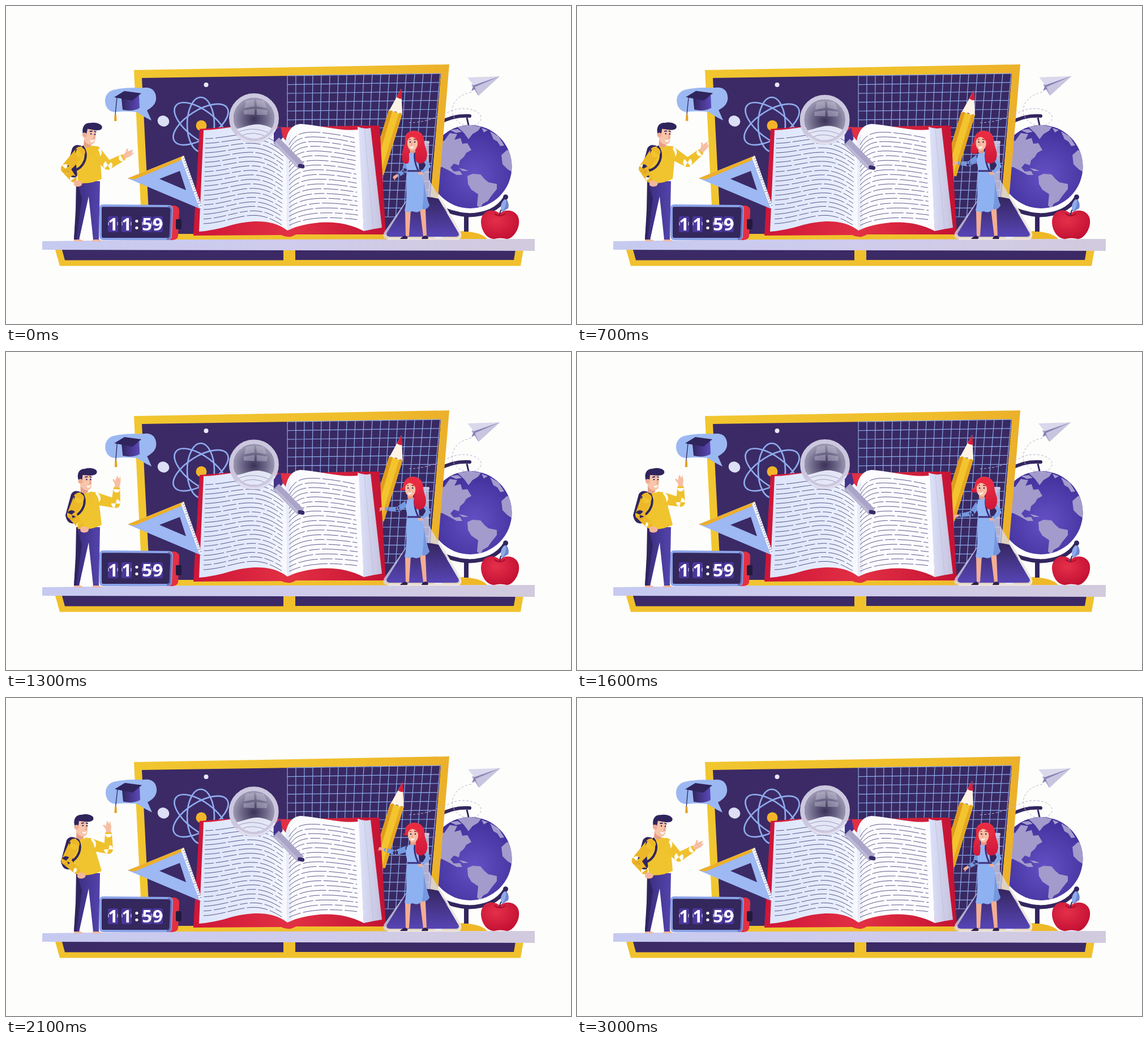
Animation of 998 by 561 pixels, one loop 3.05 s. Source, as an HTML page:

```html
<!DOCTYPE html>
<html lang="en">
<head>
<meta charset="utf-8">
<title>Learning shelf</title>
<style>
html, body { margin: 0; width: 100%; height: 100%; overflow: hidden; background: #fdfdfb; }
svg { display: block; width: 100vw; height: 100vh; }
text { font: 600 31px "Noto Sans", Roboto, sans-serif; font-stretch: extra-condensed; fill: #fff; text-anchor: middle; }
</style>
</head>
<body>
<svg viewBox="0 0 998 561">
  <defs>
    <linearGradient id="gold"><stop offset="0" stop-color="#f1c62f"/><stop offset=".7" stop-color="#f0be2c"/><stop offset="1" stop-color="#ecb02a"/></linearGradient>
    <linearGradient id="shelf"><stop offset="0" stop-color="#c6caf0"/><stop offset=".5" stop-color="#cfcbec"/><stop offset="1" stop-color="#d2cadd"/></linearGradient>
    <linearGradient id="pageL"><stop offset="0" stop-color="#dde5fb"/><stop offset=".75" stop-color="#e8eefd"/><stop offset="1" stop-color="#f8faff"/></linearGradient>
    <linearGradient id="block"><stop offset="0" stop-color="#dce3fa"/><stop offset="1" stop-color="#c6c1dd"/></linearGradient>
    <linearGradient id="cover"><stop offset="0" stop-color="#cf1538"/><stop offset=".5" stop-color="#e23044"/><stop offset="1" stop-color="#c41234"/></linearGradient>
    <linearGradient id="cap"><stop offset="0" stop-color="#32265f"/><stop offset="1" stop-color="#5c49ba"/></linearGradient>
    <linearGradient id="pants"><stop offset="0" stop-color="#3a2c7c"/><stop offset="1" stop-color="#5344ae"/></linearGradient>
    <linearGradient id="liquid" x2="0" y2="1"><stop offset="0" stop-color="#35265f"/><stop offset="1" stop-color="#5745b5"/></linearGradient>
    <linearGradient id="hair" x2="0" y2="1"><stop offset="0" stop-color="#ee2f43"/><stop offset="1" stop-color="#cf1739"/></linearGradient>
    <radialGradient id="ocean" cx=".55" cy=".6" r=".6"><stop offset="0" stop-color="#6450c4"/><stop offset="1" stop-color="#40309a"/></radialGradient>
    <radialGradient id="apple" cx=".4" cy=".35" r=".7"><stop offset="0" stop-color="#e5304a"/><stop offset="1" stop-color="#c20f32"/></radialGradient>
    <radialGradient id="lens" cx=".5" cy=".52" r=".55"><stop offset="0" stop-color="#3b3258"/><stop offset=".5" stop-color="#6a6485"/><stop offset="1" stop-color="#a5a1ba"/></radialGradient>
    <clipPath id="globeClip"><circle cx="820" cy="283.5" r="73.5"/></clipPath>
    <clipPath id="lensClip"><circle r="36"/></clipPath>
  </defs>

  <!-- globe -->
  <path d="M770 411V403L806 397Q840 399 850 411Z" fill="#efb827"/>
  <path d="M813 365V398" stroke="#33265f" stroke-width="8"/>
  <path d="M755 349Q784 367 817 369Q864 368 882 338" fill="none" stroke="#33265f" stroke-width="7" stroke-linecap="round"/>
  <circle cx="820" cy="286" r="77" fill="#fff"/>
  <path d="M764 207Q790 192 819 194" fill="none" stroke="#33265f" stroke-width="6" stroke-linecap="round"/>
  <path d="M814 197L817 210" stroke="#33265f" stroke-width="3"/>
  <circle cx="820" cy="283.5" r="73.5" fill="url(#ocean)"/>
  <g clip-path="url(#globeClip)" fill="#a39bcb">
    <path d="M755 236L774 238L784 224L797 226L792 236L803 233L806 243L815 242L822 254L813 259L809 266L802 272L800 281L791 278L785 285L791 292L802 291L806 298L796 298L782 290L770 284L757 286Z"/>
    <path d="M797 213L820 210L839 213L834 220L824 226L817 235L809 224Z"/>
    <path d="M784 219L798 217L805 222L795 224ZM840 215L851 219L844 223Z"/>
    <path d="M815 300L824 296L838 297L845 305L852 311L867 314L867 323L858 334L851 344L842 349L838 357L832 352L834 332L822 324L816 314Z"/>
    <path d="M855 221L870 230L880 246L873 247L868 239L861 235ZM875 263L885 254L899 260V296L886 288L877 279Z"/>
    <path d="M800 286L810 288L817 291L807 291Z"/>
  </g>

  <!-- board -->
  <path d="M226 113L783 103L757 412H241Z" fill="url(#gold)"/>
  <path d="M240 127L768 119L744 402H254Z" fill="#3b2a65"/>
  <path d="M496 123V402H744L768 119Z" fill="#392962"/>
  <path id="grid" fill="none" stroke="#8dabec" stroke-width="1.2"/>
  <g fill="none" stroke="#8fabee" stroke-width="2.7">
    <ellipse cx="344" cy="209" rx="55" ry="25" transform="rotate(37 344 209)"/>
    <ellipse cx="344" cy="209" rx="55" ry="25" transform="rotate(-32 344 209)"/>
    <ellipse cx="344" cy="209" rx="24" ry="48"/>
  </g>
  <circle cx="345" cy="211" r="9.5" fill="#f3b42a"/>
  <circle cx="353.500" cy="139" r="4" fill="#e8e8f8"/>
  <ellipse cx="278" cy="203" rx="10.500" ry="9.500" transform="rotate(25 278 203)" fill="#dcdff5"/>

  <g id="pencil">
    <path d="M676 184L700 190L667 298L643 292Z" fill="#f3c42d"/>
    <path d="M676 184L683 183L650 294L643 292Z" fill="#e09b1e"/>
    <path d="M694 189L700 190L667 298L661 297Z" fill="#e6a822"/>
    <path d="M698 146L676 186Q681 182 684 187Q690 184 692 190Q697 187 700 191Z" fill="#fff3e6"/>
    <path d="M698 146L690 161Q696 165 699.500 163Z" fill="#d81d38"/>
  </g>

  <path d="M822 152C800 156 784 171 789 194M712 206C744 205 761 196 789 184C815 175 846 187 838 202C828 219 796 211 790 193" fill="none" stroke="#b9b5d2" stroke-width="1" stroke-dasharray="4 3"/>
  <g id="plane">
    <path d="M872 124L822 139L834 158Z" fill="#aaa4cb"/>
    <path d="M872 124L815 126L826 140Z" fill="#d9d8ec"/>
    <path d="M872 124L826 140L822 150Z" fill="#8881b3"/>
    <path d="M872 124L828 143L835 158Z" fill="#c8c5e0"/>
  </g>

  <!-- shelf -->
  <path d="M87 430H914L909 458.500H95Z" fill="#f0c12d"/>
  <path d="M99 430H490V448.500H104ZM511 430H900L897 448H511Z" fill="#3b2a65"/>
  <path d="M64 415L300 412L934 411V432L64 430Z" fill="url(#shelf)"/>

  <!-- book -->
  <path d="M342 217L420 211L497 214L624 211H660L671 403L512 403Q500 411 486 404L331 405Z" fill="url(#cover)"/>
  <path d="M621 213Q634 218 644 215L664 391Q650 393 632 397Z" fill="url(#block)"/>
  <path d="M633 217L649 393" stroke="#b9b5d6" stroke-width="1" opacity=".6"/>
  <path d="M349 219C390 218 425 205 450 212Q480 217 495 239L497 396C470 375 432 378 400 386Q368 396 341 398Z" fill="url(#pageL)"/>
  <path d="M494 238Q499 210 520 208C555 210 590 222 623 218L632 397C605 383 575 379 545 383Q515 387 497 396Z" fill="#fcfcff"/>
  <path d="M494 238L497 396L505 393L502 226Z" fill="#dfe3f5" opacity=".65"/>
  <g id="lines" fill="none" stroke="#49437a" stroke-width=".9"/>

  <!-- set square -->
  <path d="M215 304L314 264L348 360Z" fill="#9db8f3"/>
  <path d="M215 304L314 264L316 269L227 306Z" fill="#eeaf28"/>
  <path d="M314 264L348 360L341 355L309 268Z" fill="#f2f3fc"/>
  <path id="ticks" stroke="#5a5384" stroke-width=".8"/>
  <path d="M271 305L307 291L318 325Z" fill="#3b2a65"/>

  <!-- clock -->
  <path d="M286 352H298Q307 354 306 363L304 406Q303 412 294 413H284Z" fill="#e52f42"/>
  <rect x="300" y="376" width="10" height="18" rx="2" fill="#221a3c"/>
  <path d="M172 352L287 353Q293 353 293 359L291 407Q290 411 285 411L172 411Q167 411 167 406V357Q167 352 172 352Z" fill="#33275c" stroke="#8ba4e8" stroke-width="4"/>
  <path d="M286 354Q292 354 292 360L290 406Q289 411 284 411" fill="none" stroke="#6770bb" stroke-width="3"/>
  <g id="digits"></g>

  <g id="glass">
    <path d="M35 23L47 14L51 34L40 47L35 42Z" fill="#43338a"/>
    <path d="M39 39L83 84" stroke="#aaa5c8" stroke-width="14.500"/>
    <path d="M38 44L78 85" stroke="#bdb9d6" stroke-width="4"/>
    <path d="M81 84L86 85" stroke="#382a69" stroke-width="7" stroke-linecap="round"/>
    <circle r="36" fill="url(#lens)"/>
    <g clip-path="url(#lensClip)">
      <path d="M-40 20C-20 19 -8 9 11 11Q30 14 40 24V40H-40Z" fill="#eceffd" opacity=".93"/>
      <path d="M-33 27Q-3 11 31 28M-25 32Q-1 20 25 34" fill="none" stroke="#8b86ad" stroke-width=".8"/>
      <path d="M-14 -31L0 -33L1 -21L-17 -18ZM4 -33L18 -31L23 -18L5 -21ZM-18 -14L1 -17L1 -6L-18 -7ZM5 -17L24 -14L23 -6L5 -6Z" fill="#d0cddd" opacity=".38"/>
    </g>
    <circle r="40" fill="none" stroke="#cbc7de" stroke-width="8"/>
    <path d="M-29 30A42 42 0 0 0 37 20" fill="none" stroke="#e3e1f0" stroke-width="3"/>
  </g>

  <!-- flask -->
  <path d="M733 240H747V306L802 399Q806 411 795 411H674Q663 410 668 399L733 306Z" fill="#d8dbf3" opacity=".75"/>
  <path d="M764 334L802 399Q806 411 795 411H674" fill="none" stroke="#f1e8da" stroke-width="2.500"/>
  <path d="M709 342Q736 332 764 340L799 400Q802 407 794 407H678Q670 406 673 400Z" fill="url(#liquid)"/>
  <rect x="731" y="238" width="17" height="5" rx="2" fill="#c6c4df"/>

  <!-- girl -->
  <path d="M705 360L715 360L712 406H706ZM731 358L741 358L743 406H737Z" fill="#f2ad93"/>
  <path d="M696 411Q700 406 706 405L710 409L708 411ZM734 411Q735 405 742 405L746 408L745 411Z" fill="#2d2150"/>
  <path d="M733 263Q742 264 741 282L735 291L727 289Z" fill="#33265f"/>
  <path id="girlArm" fill="#7499e0"/>
  <g id="girlHand" fill="#f2ad93"><ellipse rx="5" ry="2.600"/><path d="M0 -1L5 -4" stroke="#f2ad93" stroke-width="1.500"/></g>
  <path d="M709 288H733C740 310 741 335 748 352Q742 361 735 358Q728 367 718 362Q712 366 704 361C710 340 705 315 709 288Z" fill="#8eb1f1"/>
  <path d="M738 310C741 325 742 342 748 352Q742 361 735 358C738 342 738 325 738 310Z" fill="#7497dd"/>
  <path d="M708 263Q714 256 722 257L733 259Q740 265 737 280L733 290H709L706 274Z" fill="#93b5f3"/>
  <path d="M735 265L747 283L735 293" fill="none" stroke="#80a5e9" stroke-width="6" stroke-linejoin="round"/>
  <ellipse cx="732" cy="295" rx="4" ry="3" fill="#f2ad93"/>
  <path d="M709 291H733M722 258Q720 274 728 290" fill="none" stroke="#3d307a" stroke-width="3"/>
  <path d="M728 270L738 272L737 289H730Z" fill="#33265f"/>
  <g id="girlBack"><path d="M705 240C702 226 712 219 722 220C735 221 739 231 739 241C740 250 746 258 743 268C741 278 731 280 726 276C720 270 725 260 722 250Z" fill="url(#hair)"/></g>
  <g id="girlHead">
    <path d="M713 249H723V258Q718 262 713 258Z" fill="#e89a83"/>
    <path id="strand" d="M707 236C704 246 699 254 700 265C698 275 704 281 711 277C714 268 710 250 712 238Z" fill="url(#hair)"/>
    <path d="M709 233Q718 226 727 233L727 245Q725 255 717 255Q710 253 709 244Z" fill="#f8bfa5"/>
    <path d="M705 242C704 228 714 220 724 222C734 226 735 240 730 249C728 238 723 231 716 231Q709 233 708 243Z" fill="#e92b41"/>
    <path d="M712 236L715 235M720 235L724 236" stroke="#8d2038" stroke-width="1.300"/>
    <circle cx="714" cy="240" r="1.300" fill="#32254f"/><circle cx="722" cy="240" r="1.300" fill="#32254f"/>
    <path d="M717 240L715.500 245H718" fill="none" stroke="#df9078" stroke-width="1"/>
    <path d="M713 248Q717 250 721 247Q719 252 715 251Z" fill="#fff"/>
  </g>

  <!-- apple -->
  <path d="M872 366C884 356 904 361 906 377C908 395 894 411 885 411Q873 408 862 411C850 411 839 397 839 380C840 361 858 355 872 366Z" fill="url(#apple)"/>
  <path d="M863 366Q872 374 882 366" fill="none" stroke="#a80d2b" stroke-width="2"/>
  <path d="M872 369Q872 362 877 357" fill="none" stroke="#33265f" stroke-width="2"/>
  <path d="M876 363C871 352 876 344 883 339C890 348 889 358 876 363Z" fill="#8fabea"/>
  <path d="M876 363Q885 354 883 339Q890 350 887 357Z" fill="#6f87cf"/>
  <circle cx="882.500" cy="337" r="4.500" fill="#33265f"/>

  <!-- boy -->
  <path d="M120 415V411H129L136 414V415ZM152 415L154 410H163L168 414V415Z" fill="#f4b699"/>
  <path d="M124 309H150L143 345L129 412H120L123 360Z" fill="#30245f"/>
  <path d="M126 309H166L164 412H154L146 336L129 412H122Z" fill="url(#pants)"/>
  <path d="M126 312L124 360L120 412H124L134 340Z" fill="#30245f"/>
  <path id="pack" fill="#31255f"/>
  <path id="boyArmL" fill="#e9ad24"/>
  <path id="torso" fill="#f0c42e"/>
  <path id="strap" fill="none" stroke="#31255f" stroke-width="4"/>
  <path id="boyForeL" fill="#ecb728"/>
  <g id="boyHandL" fill="#f4b699"><path d="M-7 -4Q3 -8 8 0L6 4Q-2 8 -7 3Z"/></g>
  <path id="boyArmR" fill="#efc12c"/>
  <g id="boyHandR" fill="#f6bea3">
    <path d="M-8 -4L0 -5L7 -4L13 -2L7 1L12 3L3 5L-8 4Z"/>
    <path d="M-2 -3L4 -8" stroke="#f6bea3" stroke-width="3" stroke-linecap="round"/>
  </g>
  <g id="boyHead">
    <path d="M-7 -13H6V1Q0 6 -7 1Z" fill="#e6a086"/>
    <path d="M-8 -31H11L13 -20L12 -7Q9 -1 2 -2Q-6 -4 -8 -14Z" fill="#f8c4aa"/>
    <path d="M-10 -19C-14 -30 -10 -40 1 -40C10 -43 20 -40 22 -36Q24 -29 12 -28L-3 -29L-4 -19Z" fill="#30245d"/>
    <circle cx="-7" cy="-18" r="4" fill="#efac91"/>
    <path d="M1 -25L6 -26M9 -26L13 -25" stroke="#30245d" stroke-width="1.800"/>
    <circle cx="4" cy="-21" r="1.300" fill="#30245d"/><circle cx="11" cy="-21" r="1.300" fill="#30245d"/>
    <path d="M9 -21L11 -14H8" fill="none" stroke="#de957c" stroke-width="1.200"/>
    <path d="M3 -10Q7 -9 11 -11Q10 -6 6 -7Q4 -7 3 -10Z" fill="#fff"/>
  </g>

  <!-- speech bubble -->
  <g id="bubble">
    <path d="M195 147C214 143 234 145 245 144C259 143 266 152 265 165Q264 176 249 184L257 202Q242 195 231 187Q209 185 193 187C181 187 175 177 175 167C175 155 184 148 195 147Z" fill="#9bb8f2"/>
    <path d="M204 163L235 158L236 180Q224 187 206 183Z" fill="url(#cap)"/>
    <path d="M191 161L209 150L239 154L223 167Z" fill="#30245d"/>
    <g id="tassel"><path d="M214 157L196 161L193 192" fill="none" stroke="#30245d" stroke-width="1.300"/><path d="M191.500 192H195L195.500 203H191Z" fill="#e2a326"/></g>
  </g>
</svg>
<script>
const LOOP = 3050, STEP = 50;
const $ = id => document.getElementById(id);
const set = (id, name, value) => $(id).setAttribute(name, value);
const move = (id, x, y, turn = 0) => set(id, 'transform', `translate(${x} ${y}) rotate(${turn})`);
const mix = (a, b, u) => a + (b - a) * u;

let seed = 7;
const rand = () => (seed = seed * 16807 % 2147483647) / 2147483647;

function drawGrid() {
  const at = (u, v) => {
    const y = mix(mix(123, 119, u), 372, v);
    return `${497 + u * (270 - 24 * v)} ${y}`;
  };
  let d = '';
  for (let i = 0; i <= 18; i++) d += `M${at(i / 18, 0)}L${at(i / 18, 1)}`;
  for (let i = 0; i <= 16; i++) d += `M${at(0, i / 16)}L${at(1, i / 16)}`;
  set('grid', 'd', d);
}

function drawLines() {
  const leftY = (u, v) => 234 + 150 * v - (10 + 5 * v) * Math.sin(Math.PI * u ** 1.6) + (16 - 14 * v) * u ** 4;
  const rightY = (u, v) => 245 + 142 * v - (25 - 5 * v) * (1 - Math.exp((6 * v - 9) * u)) + (13 - 4 * v) * u * u;
  const row = (x, w, y, v) => {
    const points = Array.from({ length: 25 }, (_, i) => `${x + w * i / 24} ${y(i / 24, v).toFixed(1)}`);
    const dash = Array.from({ length: 3 }, () => `${(14 + 34 * rand()).toFixed(0)} 4`).join(' ');
    return `<path d="M${points.join('L')}" stroke-dasharray="${dash}"/>`;
  };
  let out = '';
  for (let i = 0; i < 19; i++) {
    const v = i / 18;
    out += row(352 - 3 * v, 138, leftY, v) + row(500, 116 + 6 * v, rightY, v);
  }
  $('lines').innerHTML = out;
}

function drawTicks() {
  let d = '';
  for (let i = 1; i < 22; i++) {
    const u = i / 23;
    d += `M${mix(314, 348, u)} ${mix(264, 360, u)}l${i % 5 ? -3 : -5} 1.5`;
  }
  set('ticks', 'd', d);
}

function drawDigits() {
  const cells = [['1', 189], ['1', 213], [':', 231], ['5', 249], ['9', 268]];
  const tile = x => `<rect x="${x - 9}" y="371" width="18" height="28" rx="3" fill="#4a379b"/>` +
    `<path d="M${x - 8} 381v6M${x + 8} 381v6" stroke="#b9b4e0" stroke-width="1.5"/>`;
  $('digits').innerHTML = cells.map(([c, x]) =>
    (c === ':' ? '' : tile(x)) + `<text x="${x}" y="${c === ':' ? 394 : 396}">${c}</text>`).join('');
}

// Smooth periodic curve through rows of [time, ...values].
function pose(rows, t) {
  const n = rows.length;
  const key = i => {
    const lap = Math.floor(i / n), r = rows[i - lap * n];
    return [r[0] + lap * LOOP, ...r.slice(1)];
  };
  let i = n - 1;
  while (rows[i][0] > t) i--;
  const [a, b, c, d] = [-1, 0, 1, 2].map(k => key(i + k));
  const span = c[0] - b[0], u = (t - b[0]) / span;
  return b.slice(1).map((p, k) => {
    const q = c[k + 1];
    const m = (q - a[k + 1]) / (c[0] - a[0]) * span;
    const o = (d[k + 1] - p) / (d[0] - b[0]) * span;
    return p + u * (m + u * (3 * (q - p) - 2 * m - o + u * (2 * (p - q) + m + o)));
  });
}

// Tapered limb through [x, y, radius] joints.
function limb(...joints) {
  return joints.map(([x, y, r], i) => {
    let d = `M${x - r} ${y}a${r} ${r} 0 1 1 ${2 * r} 0a${r} ${r} 0 1 1 ${-2 * r} 0Z`;
    if (i) {
      const [px, py, pr] = joints[i - 1];
      const len = Math.hypot(x - px, y - py) || 1;
      const nx = (py - y) / len, ny = (x - px) / len;
      d += `M${px - nx * pr} ${py - ny * pr}L${px + nx * pr} ${py + ny * pr}L${x + nx * r} ${y + ny * r}L${x - nx * r} ${y - ny * r}Z`;
    }
    return d;
  }).join('');
}
const angle = (x0, y0, x1, y1) => Math.atan2(y1 - y0, x1 - x0) * 180 / Math.PI;

// time, chest, head, tilt, back elbow, hip hand, elbow xy, wrist xy, hand xy
const boyKeys = [
  [0, 144, 144, 6, 105, 127, 180, 281, 205, 268, 215, 262],
  [400, 152, 154, 7, 113, 129, 185, 281, 220, 270, 230, 264],
  [1000, 148, 146, 0, 119, 140, 202, 271, 209, 247, 213, 236],
  [1600, 136, 132, 0, 111, 135, 183, 265, 183, 240, 183, 229],
  [2100, 134, 131, 2, 106, 133, 181, 267, 181, 240, 181, 229],
  [2550, 138, 135, 4, 106, 131, 183, 276, 191, 252, 196, 242]
];
// time, head, strand length, elbow xy, hand xy
const girlKeys = [
  [0, 0, 1, 704, 291, 688, 301],
  [400, -4, 1, 699, 289, 679, 293],
  [1000, -4, .15, 688, 271, 661, 265],
  [1600, -3, .25, 697, 285, 670, 289],
  [2100, 1, .1, 688, 273, 663, 266],
  [2550, 2, .9, 697, 282, 670, 283]
];

function drawBoy(t) {
  const [x, head, tilt, backX, hipX, ex, ey, wx, wy, hx, hy] = pose(boyKeys, t);
  set('pack', 'd', `M${x - 10} 247Q${x - 22} 242 ${x - 27} 251L${x - 37} 288Q${x - 34} 305 ${x - 20} 302L${x - 4} 270Z`);
  set('boyArmL', 'd', limb([x - 13, 258, 10], [backX, 287, 8]));
  set('torso', 'd', `M127 310L${x - 22} 262Q${x - 20} 249 ${x - 8} 247Q${x} 251 ${x + 8} 246Q${x + 19} 248 ${x + 22} 262L169 305Q150 315 127 312Z`);
  set('strap', 'd', `M${x - 9} 247C${x + 3} 263 ${x - 5} 285 ${x - 25} 291`);
  set('boyForeL', 'd', limb([x - 13, 258, 9], [backX, 287, 8], [hipX - 8, 305, 6]));
  move('boyHandL', hipX, 313);
  set('boyArmR', 'd', limb([x + 14, 258, 11], [ex, ey, 8], [wx, wy, 6]));
  move('boyHandR', hx, hy, angle(wx, wy, hx, hy));
  move('boyHead', head, 246, tilt);
}

function drawGirl(t) {
  const [head, strand, ex, ey, hx, hy] = pose(girlKeys, t);
  move('girlBack', head * .5, 0);
  move('girlHead', head, 0);
  set('strand', 'transform', `translate(0 ${238 * (1 - strand)}) scale(1 ${strand})`);
  set('girlArm', 'd', limb([711, 265, 5.5], [ex, ey, 4.5], [mix(ex, hx, .7), mix(ey, hy, .7), 3.2]));
  move('girlHand', hx, hy, angle(ex, ey, hx, hy));
}

function draw(t) {
  const bob = (1 - Math.cos(4 * Math.PI * t / LOOP)) / 2;
  move('glass', 438 - .4 * bob, 198 + 2.7 * bob);
  move('pencil', 3 * bob, 2.5 * bob);
  move('plane', 1.2 * bob, -.3 * bob);
  move('bubble', 1.2 * bob, -.3 * bob);
  set('tassel', 'transform', `rotate(${1.3 * Math.sin(4 * Math.PI * t / LOOP)} 196 161)`);
  drawBoy(t);
  drawGirl(t);
}

drawGrid();
drawLines();
drawTicks();
drawDigits();
const start = performance.now();
function tick() {
  const t = (performance.now() - start) % LOOP;
  draw(Math.floor(t / STEP) * STEP);
  requestAnimationFrame(tick);
}
tick();
</script>
</body>
</html>
```
